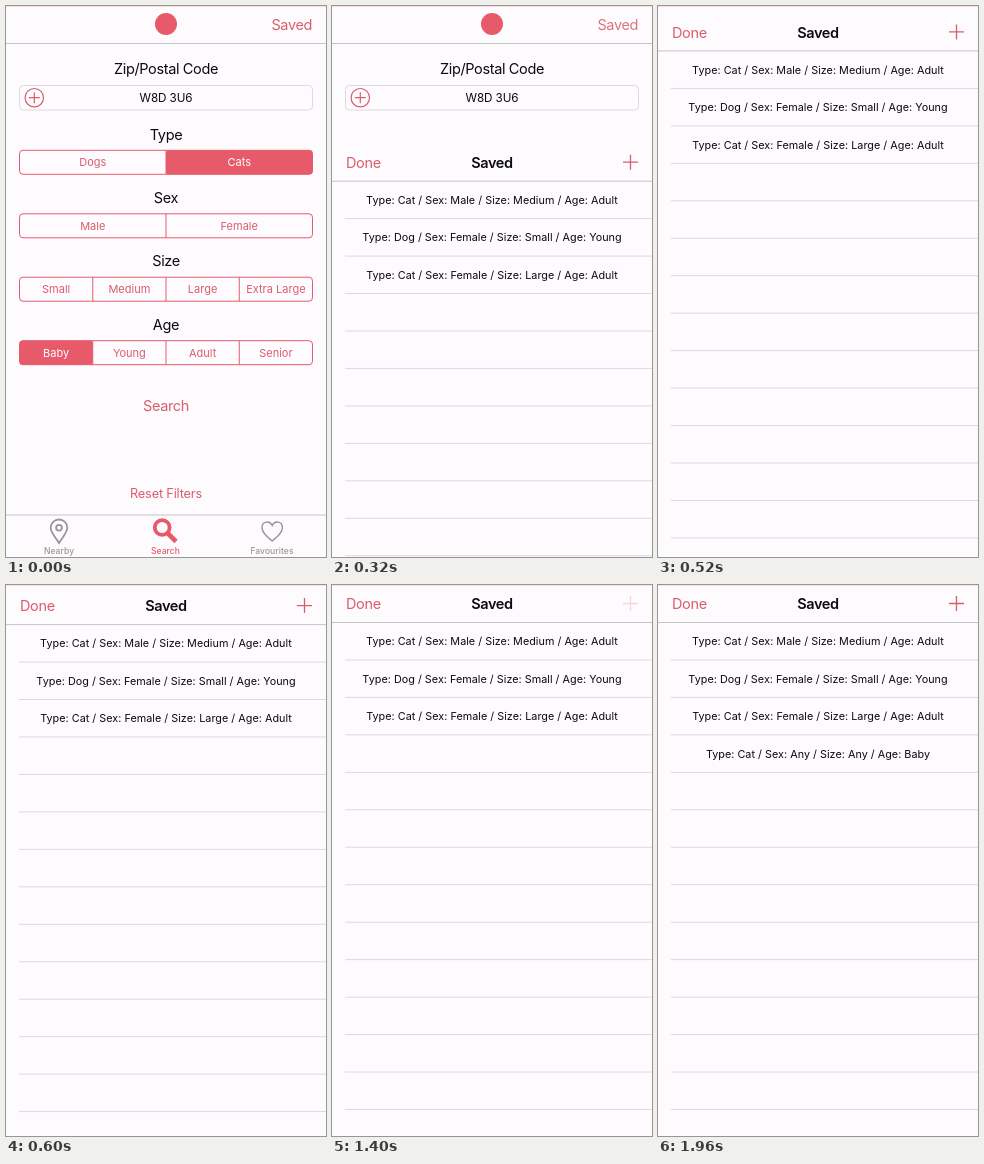
Animation, 320 px wide and 551 px high, one loop 2 s. Source, as an HTML page:

```html
<!DOCTYPE html>
<html lang="en">
<head>
<meta charset="utf-8">
<title>Pet search filters</title>
<style>
  html, body { margin: 0; height: 100%; overflow: hidden; background: #fefbfe; }
  svg { display: block; width: 100vw; height: 100vh; }
  text { font-family: Inter, Roboto, sans-serif; white-space: pre; }
</style>
</head>
<body>
<svg id="stage" viewBox="0 0 320 551"></svg>
<script>
const PINK = '#e65a6a', ROSE = '#d75f6b', INK = '#0b0a0c', GREY = '#98969a', PAPER = '#fefbfe';
const ROW = 37.46, NAV = 37.5;

// Text centred vertically on cy; tracking is in em.
function label(str, x, cy, { size = 14.5, fill = INK, anchor = 'middle', weight = 400, track = -0.025, id = '' } = {}) {
  return `<text ${id && `id="${id}"`} x="${x}" y="${cy + size * 0.36}" font-size="${size}" fill="${fill}"
    text-anchor="${anchor}" font-weight="${weight}" letter-spacing="${track * size}">${str}</text>`;
}

const line = (x1, y1, x2, y2, color, width = 1) =>
  `<path d="M${x1} ${y1}L${x2} ${y2}" stroke="${color}" stroke-width="${width}"/>`;

const plus = (x, y, r, width, id = '') =>
  `<path ${id && `id="${id}"`} d="M${x - r} ${y}h${2 * r}M${x} ${y - r}v${2 * r}" stroke="${ROSE}" stroke-width="${width}"/>`;

function segments(title, y, options, chosen) {
  const left = 13.5, width = 293, step = width / options.length;
  let out = label(title, 160, y - 28);
  options.forEach((option, i) => {
    const x = left + i * step, on = option === chosen;
    if (on) out += `<rect x="${x}" y="${y - 12}" width="${step}" height="24" rx="2.5" fill="${PINK}"/>`;
    if (i) out += line(x, y - 12, x, y + 12, PINK);
    out += label(option, x + step / 2, y, { size: 11, track: 0, fill: on ? '#fff' : ROSE });
  });
  return out + `<rect x="${left}" y="${y - 12}" width="${width}" height="24" rx="3.5" fill="none" stroke="${PINK}"/>`;
}

const tab = (str, x, fill) => label(str, x, 545, { size: 8.5, weight: 500, track: 0.01, fill });

function form() {
  return line(0, NAV, 320, NAV, '#c6c3c7') +
    `<circle cx="160" cy="18" r="11" fill="${PINK}"/>` +
    label('Saved', 306, 19, { fill: ROSE, anchor: 'end', id: 'savedButton' }) +
    label('Zip/Postal Code', 160, 63) +
    `<rect x="13.5" y="79.5" width="293" height="24.5" rx="4" fill="${PAPER}" stroke="#dddadd"/>
     <circle cx="28.3" cy="91.7" r="9.2" fill="none" stroke="${ROSE}" stroke-width="1.2"/>` +
    plus(28.3, 91.7, 5.5, 1.2) +
    label('W8D 3U6', 160, 91.5, { size: 11.7, track: -0.01 }) +
    segments('Type', 156.3, ['Dogs', 'Cats'], 'Cats') +
    segments('Sex', 219.8, ['Male', 'Female']) +
    segments('Size', 283.2, ['Small', 'Medium', 'Large', 'Extra Large']) +
    segments('Age', 346.7, ['Baby', 'Young', 'Adult', 'Senior'], 'Baby') +
    label('Search', 160, 400, { fill: ROSE }) +
    label('Reset Filters', 160, 487, { size: 12.8, fill: ROSE, track: -0.015 }) +
    line(0, 509, 320, 509, '#c6c3c7') +
    `<g fill="none" stroke="${GREY}" stroke-width="1.8">
       <path d="M53 537C49 530.5 44.7 526.5 44.7 521.8a8.3 8.3 0 0 1 16.6 0C61.3 526.5 57 530.5 53 537z"/>
       <circle cx="53" cy="521.8" r="2.9"/>
       <path stroke-width="1.4" d="M266.2 535C261 530.5 256 527 256 521.7c0-6.5 7.7-7.5 10.2-2.2c2.5-5.3 10.2-4.3 10.2 2.2C276.4 527 271.4 530.5 266.2 535z"/>
     </g>
     <circle cx="156.2" cy="521.5" r="7.4" fill="none" stroke="${PINK}" stroke-width="3.8"/>` +
    line(161.5, 527, 170, 535.5, PINK, 4.6) +
    tab('Nearby', 53, GREY) + tab('Search', 159.5, PINK) + tab('Favourites', 266, GREY);
}

function sheet() {
  const rows = [
    ['Cat', 'Male', 'Medium', 'Adult'],
    ['Dog', 'Female', 'Small', 'Young'],
    ['Cat', 'Female', 'Large', 'Adult'],
    ['Cat', 'Any', 'Any', 'Baby'],
  ];
  let out = `<rect y="-17" width="320" height="600" fill="${PAPER}"/>` +
    line(0, NAV, 320, NAV, '#c6c3c7') +
    label('Done', 14, 19, { fill: ROSE, anchor: 'start' }) +
    label('Saved', 160, 19, { weight: 600 }) +
    plus(298.5, 18.5, 7.5, 1.3, 'addButton');
  for (let i = 1; i < 15; i++) out += line(13, NAV + i * ROW, 320, NAV + i * ROW, '#dcd9dd');
  rows.forEach(([type, sex, size, age], i) => {
    out += label(`Type: ${type} / Sex: ${sex} / Size: ${size} / Age: ${age}`, 160, NAV + (i + 0.5) * ROW + 0.2,
      { size: 10.8, track: 0.002, id: 'row' + i });
  });
  return out;
}

const $ = id => document.getElementById(id);
$('stage').innerHTML = form() + `<g id="sheet">${sheet()}</g><rect width="320" height="1" fill="#fbdfdc"/>`;

const clamp = v => Math.min(1, Math.max(0, v));

// A tapped button dims at once, then eases back.
function tapOpacity(t, down, up) {
  if (t < down) return 1;
  return 1 - 0.77 * (1 - clamp((t - up) / 450)) ** 4;
}

// Critically damped spring with a response of 350 ms.
function sheetOffset(t) {
  if (t >= 720) return 0;
  const z = 2 * Math.PI * Math.max(0, t - 168.5) / 350;
  return 569 * (1 + z) * Math.exp(-z);
}

const start = performance.now();
function draw() {
  const t = (performance.now() - start) % 2000;
  $('sheet').setAttribute('transform', `translate(0 ${sheetOffset(t)})`);
  $('savedButton').setAttribute('opacity', tapOpacity(t, 120, 160));
  $('addButton').setAttribute('opacity', tapOpacity(t, 1400, 1470));
  $('row3').setAttribute('opacity', clamp((t - 1470) / 200));
  requestAnimationFrame(draw);
}
draw();
</script>
</body>
</html>
```
